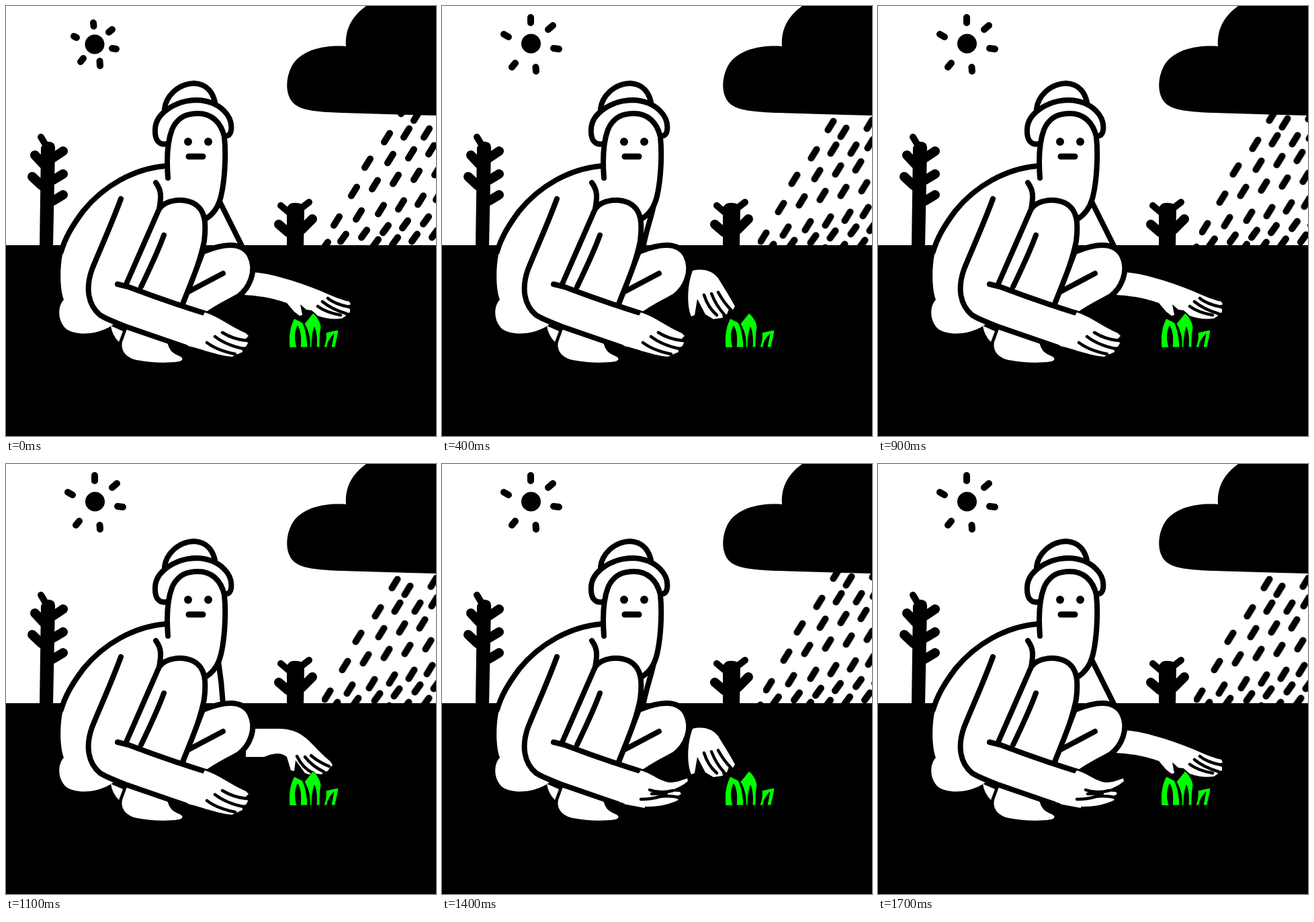
An HTML page that plays this animation: 640 by 640 pixels, repeating every 1800 ms.

```html
<!DOCTYPE html>
<html lang="en">
<head>
<meta charset="utf-8">
<title>Gardener</title>
<style>
  html, body { margin: 0; height: 100%; overflow: hidden; background: #fff; }
  svg { display: block; width: 100vw; height: 100vh; }
  path { stroke-linecap: round; stroke-linejoin: round; }
  .line { fill: none; stroke: #000; stroke-width: 8; }
  .skin { fill: #fff; }
  .shape { fill: #fff; stroke: #000; stroke-width: 8; }
  .slit { fill: none; stroke: #000; stroke-width: 4.5; }
  .stub { fill: none; stroke: #000; stroke-width: 10; }
  .twig { fill: none; stroke: #000; stroke-width: 14; }

  /* the petting arm: nine beats of 100 ms */
  .pose { animation: beat 900ms step-end infinite; animation-delay: calc((var(--at) - 9) * 100ms); }
  .hold { animation-name: hold; }
  @keyframes beat { 0% { visibility: visible; } 11.111%, 100% { visibility: hidden; } }
  @keyframes hold { 0% { visibility: visible; } 22.222%, 100% { visibility: hidden; } }

  /* weather: three beats of 200 ms */
  #rain { animation: fall 600ms step-end infinite; }
  #drizzle { animation: drift 600ms step-end infinite; }
  @keyframes fall {
    33.333% { transform: translate(-5.5px, 10px); }
    66.666%, 100% { transform: translate(-13.5px, 24px); }
  }
  @keyframes drift {
    33.333% { transform: translate(-5px, 7px); }
    66.666%, 100% { transform: translate(-12.5px, 15px); }
  }
  .dim { animation: dim 600ms step-end infinite; }
  .bright { animation: bright 600ms step-end infinite; }
  @keyframes dim { 0% { visibility: visible; } 33.333%, 100% { visibility: hidden; } }
  @keyframes bright { 0% { visibility: hidden; } 33.333%, 100% { visibility: visible; } }

  .flat { animation: flat 1800ms step-end infinite; }
  .raised { animation: raised 1800ms step-end infinite; }
  @keyframes flat { 0% { visibility: visible; } 77.777%, 100% { visibility: hidden; } }
  @keyframes raised { 0% { visibility: hidden; } 77.777%, 100% { visibility: visible; } }
</style>
</head>
<body>
<svg viewBox="0 0 640 640">
  <defs>
    <g id="reach">
      <path class="skin" d="M325 396H366C395 398 430 409 468 424C482 430 497 437 511 440L513 444L506 447L512 451L512 456L505 458L506 461L500 465C488 467 475 465 464 461L455 453L447 452L438 444L441 460L437 461L429 455L418 442C400 436 385 432 355 430H325Z"/>
      <path class="slit" d="M479 435Q490 444 511 448M471 440Q484 451 507 458M464 447Q476 456 498 460"/>
    </g>
    <g id="drag">
      <path class="skin" d="M325 391H366C392 390 405 396 418 408C430 420 440 431 451 440L454 445L450 449L447 454L441 455L438 459L431 458L425 461L413 457L399 438L397 454L392 453L386 433C378 427 370 426 352 433H325Z"/>
      <path class="slit" d="M422 431Q434 441 449 447M413 433Q424 447 441 455M401 432Q410 450 425 457"/>
    </g>
  </defs>

  <!-- sun -->
  <g class="dim">
    <circle cx="132" cy="57" r="14.5"/>
    <path class="stub" d="M130 25L130.500 30M153 39L158 35M158 63L164 64M139.500 82L140 89M111 83L115 78M101 45L105 47"/>
  </g>
  <g class="bright">
    <circle cx="132.500" cy="56" r="14.5"/>
    <path class="stub" d="M132 17V25M158 35L165 29M166 63L174 64M139.500 91L140 97M104 91L109 85M92 42L99 46"/>
  </g>

  <path id="rain" class="stub"/>
  <path id="drizzle" class="stub"/>
  <path d="M536 0C515 15 504 35 506 60C478 58 440 63 425 90C414 112 416 140 434 149C445 156 470 158 500 159L600 162L640 163V0Z"/>
  <rect y="356" width="640" height="284"/>

  <!-- trees -->
  <path d="M50 358L52 211Q56 201 65 202Q74 203 73 213L70 358ZM418 358V302Q420 292 431 293Q443 293 444 302L443 358Z"/>
  <path class="twig" d="M70 226L85 216M43 222L55 235M70 259L85 250M39 254L53 267M70 290L85 281M406 325L420 337M456 317L440 333"/>
  <path class="stub" d="M52 195L58 205M409 297L422 308M451 292L438 302"/>

  <!-- petting arm -->
  <g class="pose hold" style="--at:8">
    <path class="line" d="M318 291L351 357"/>
    <use href="#reach"/>
  </g>
  <g class="pose" style="--at:1">
    <path class="line" d="M318 291L343 357"/>
    <use href="#reach" x="-22" y="-2"/>
  </g>
  <g class="pose" style="--at:2">
    <path class="line" d="M316 293Q321 325 323 357"/>
    <use href="#drag" x="32" y="3"/>
  </g>
  <g class="pose" style="--at:3">
    <path class="line" d="M316 294Q312 318 303 358"/>
    <use href="#drag"/>
  </g>
  <g class="pose hold" style="--at:4">
    <path class="line" d="M316 292C312 315 303 335 299 362"/>
    <path class="skin" d="M373 394C390 390 403 395 411 405C420 420 428 432 436 447L433 452L427 451L424 459L417 458L418 464L404 466L392 459L380 436L376 460L371 462C364 445 365 415 373 394Z"/>
    <path class="slit" d="M411 426Q419 441 430 452M401 428Q408 446 420 459M390 430Q396 449 409 460"/>
  </g>
  <g class="pose" style="--at:6">
    <path class="line" d="M314 298Q321 325 324 357"/>
    <path class="skin" d="M325 400H366C400 400 440 398 462 398C473 402 475 415 470 427C467 440 461 450 453 458L444 459L437 456L425 458L421 453L412 451L411 446L403 445L404 432C385 431 370 434 350 434H325Z"/>
    <path class="slit" d="M430 412Q416 419 405 432M441 419Q426 429 404 438M448 427Q433 440 411 447M455 434Q444 447 424 453"/>
  </g>
  <g class="pose" style="--at:7">
    <path class="line" d="M318 291Q328 322 335 357"/>
    <path class="skin" d="M325 396H366C395 398 420 403 450 403C472 404 488 417 494 434L493 442L488 444L486 453L479 452L476 457L464 457L456 446L444 434L440 451L435 453L429 443L426 431C400 431 380 435 352 434H325Z"/>
    <path class="slit" d="M482 425L491 442M472 427Q477 440 485 449M460 430Q466 444 475 454M427 418L425 432"/>
  </g>

  <!-- sprouts -->
  <g fill="#0f0" stroke="#000" stroke-width="1">
    <path d="M422 508C420 490 423 476 429 465L441 471C446 480 448 492 449 508H438C440 495 438 482 434 476C430 485 429 496 433 508Z"/>
    <path d="M444 473C449 467 453 462 457 457C463 462 468 470 469 478C467 488 467 498 467 508H462C463 495 462 485 459 478C456 487 455 497 455 508H452C453 494 450 483 444 473Z"/>
    <path d="M476 486C482 485 488 483 495 482C494 492 491 500 490 508H484L488 488C482 495 478 501 478 508H473C476 500 477 492 476 486Z"/>
  </g>

  <!-- torso, hat and head -->
  <path class="skin" d="M241 237C190 242 145 268 115 305C98 328 88 350 84 370C80 390 80 422 86 437C76 448 77 470 90 481C105 491 137 490 160 474L262 446L298 330Z"/>
  <path class="line" d="M238 238C190 242 145 268 115 305C98 328 88 345 82 366"/>
  <path class="shape" d="M236 153C238 135 255 116 280 115C300 116 308 130 311 143"/>
  <path class="shape" d="M240 205C228 208 221 200 222 183C223 160 252 140 285 140C320 142 338 165 335 185C334 192 330 194 326 193"/>
  <path class="shape" d="M241 256C239 230 239 205 247 184C256 163 272 160 286 160C305 160 320 172 325 195C328 225 325 262 320 283C316 300 307 311 297 317"/>
  <circle cx="271" cy="202" r="6"/>
  <circle cx="301" cy="202" r="6"/>
  <path class="line" style="stroke-width:9" d="M272 224H293"/>

  <!-- legs -->
  <path class="shape" d="M262 446L293 366C325 353 352 350 363 372C374 395 362 420 346 432C330 441 312 449 294 463"/>
  <path class="line" d="M272 425L323 398"/>
  <path class="shape" d="M178 416L228 302C238 288 262 286 278 293C298 303 298 325 295 350C288 385 275 412 262 446"/>
  <path class="line" d="M223 263C232 275 231 285 228 302M235 341Q226 366 201 418"/>
  <path class="skin" d="M156 476L174 484L168 500Q158 490 156 476ZM181 478L173 500C170 514 180 524 195 527C215 531 240 532 258 529Q266 526 260 522C248 517 243 513 240 500Z"/>

  <!-- resting arm -->
  <path class="skin" d="M150 420L178 416L300 457L302 512L270 506L178 477L140 460Z"/>
  <path class="line" d="M166 414L182 418Q240 440 298 458M171 287C155 330 140 362 128 392C118 420 122 445 140 460C150 466 165 472 178 477L268 508"/>
  <g class="flat">
    <path class="skin" d="M296 456C318 463 335 478 357 487L361 491L357 495L360 502L357 507L351 508L352 515L345 518L336 522C325 521 310 518 268 504Z"/>
    <path class="slit" d="M322 486Q338 496 358 498M311 492Q328 505 353 510M299 501Q315 513 341 518"/>
  </g>
  <g class="raised">
    <path class="skin" d="M296 456C315 462 325 473 340 474C350 474 358 470 365 468L366 472C358 479 347 484 336 487L354 488L356 491L348 496L352 500C340 506 325 510 305 510Q285 509 264 503Z"/>
    <path class="slit" d="M309 485Q325 491 344 486M296 499Q312 499 324 495Q338 493 352 496M312 491L334 490"/>
  </g>
</svg>
<script>
  // resting places of the drops, as x y pairs
  const high = [
    592,154, 611,164, 650,152, 567,196, 596,189, 626,189, 651,181,
    538,234, 572,227, 603,220, 633,214, 518,276, 549,266, 580,258, 611,252, 642,245,
    492,320, 525,311, 558,303, 588,296, 617,289, 644,282
  ];
  const low = [
    475,357, 502,345, 533,339, 565,332, 594,325, 625,319, 653,314,
    550,353, 579,350, 608,345, 638,339
  ];
  const drops = (pts, len) => pts.reduce((d, x, i) =>
    i % 2 ? d : d + `M${x + 4} ${pts[i + 1] - len / 2}l-8 ${len}`, "");
  document.getElementById("rain").setAttribute("d", drops(high, 13));
  document.getElementById("drizzle").setAttribute("d", drops(low, 11));
</script>
</body>
</html>
```
